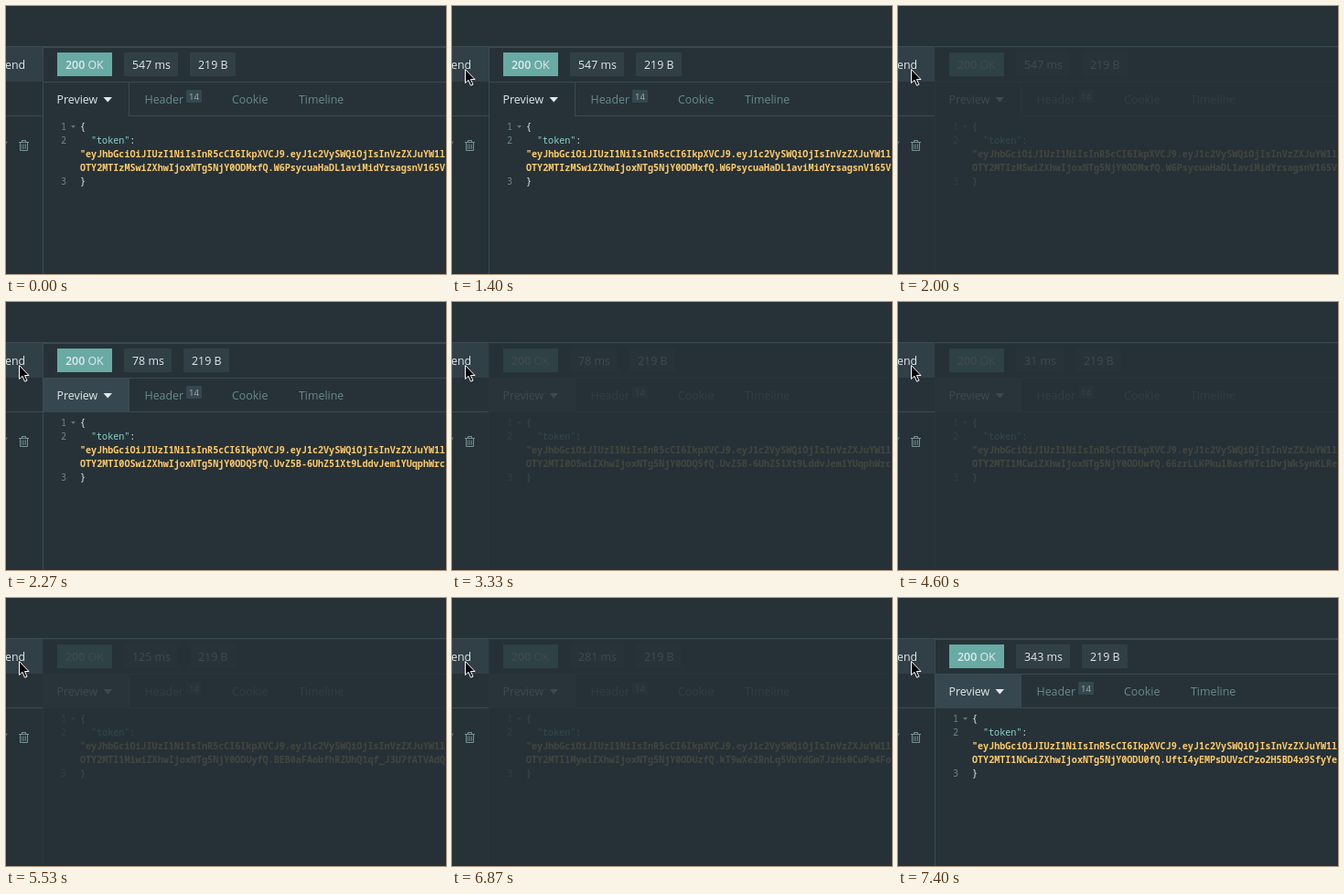
An HTML page that plays this animation: 481x294 px, repeating every 8 s.

```html
<!DOCTYPE html>
<html lang="en">
<head>
<meta charset="utf-8">
<title>Response preview</title>
<style>
  html, body { margin: 0; width: 100%; height: 100%; overflow: hidden; background: #263238; }
  svg { display: block; width: 481px; height: 294px; }
  text { font: 12.4px "Open Sans", "Noto Sans", sans-serif; fill: #e3e8ea; }
  .tab { fill: #6c898d; }
  .badge { font-size: 9.5px; fill: #9eafb4; }
  .code text { font: 500 10.08px "Noto Sans Mono", "DejaVu Sans Mono", monospace; fill: #eef3f4; }
  .code .num { fill: #71868c; font-weight: 400; }
  .code .key { fill: #8cd3cb; }
  .code .str { fill: #ffcb6b; font-weight: 600; }
  .pill { fill: #313f46; }
  .line { fill: #3b4b52; }
  .raised { fill: #37474f; }
</style>
</head>
<body>
<svg viewBox="0 0 481 294">
  <rect width="481" height="294" fill="#263238"/>

  <!-- request pane -->
  <rect y="45" width="40" height="38" fill="#313f46"/>
  <rect class="line" y="44" width="481" height="1"/>
  <rect class="line" y="120" width="40" height="1"/>
  <text x="-1" y="69">end</text>
  <path d="M-1 153L1 148.500" stroke="#6c898d" fill="none"/>
  <g fill="none" stroke="#7b9297">
    <path d="M14 149.500H25M17.500 149V147.500H21.500V149M15.500 150V158.500H23.500V150"/>
    <path d="M17.500 151.500V157M19.500 151.500V157M21.500 151.500V157" stroke-width=".8"/>
  </g>

  <!-- response pane -->
  <g class="line">
    <rect x="40" y="45" width="441" height="1"/>
    <rect x="40" y="45" width="1" height="249"/>
    <rect x="41" y="83" width="440" height="1"/>
    <rect x="134" y="120" width="347" height="1"/>
    <rect x="134" y="84" width="1" height="37"/>
  </g>
  <rect id="focus" class="raised" x="41" y="84" width="93" height="37"/>

  <rect x="56" y="51" width="60" height="26" fill="#68aaa4"/>
  <text x="65" y="69" fill="#fff"><tspan font-weight="600">200</tspan> OK</text>
  <rect id="timeBox" class="pill" x="129" y="51" height="26"/>
  <text id="time" x="138" y="69"></text>
  <g id="size">
    <rect class="pill" y="51" width="50" height="26"/>
    <text x="9" y="69">219 B</text>
  </g>

  <text x="55.500" y="107">Preview</text>
  <path d="M106.500 100H116L111.250 105.500Z" fill="#e3e8ea"/>
  <text class="tab" x="151.500" y="107">Header</text>
  <rect class="raised" x="197" y="92" width="17" height="14" rx="1"/>
  <text class="badge" x="200" y="102.500">14</text>
  <text class="tab" x="247" y="107">Cookie</text>
  <text class="tab" x="320" y="107">Timeline</text>

  <g class="code">
    <text class="num" x="60" y="136">1</text>
    <text class="num" x="60" y="151">2</text>
    <text class="num" x="60" y="196">3</text>
    <path d="M71 131H76L73.500 134Z" fill="#61757b"/>
    <text x="81" y="136">{</text>
    <text x="93" y="151"><tspan class="key">"token"</tspan>:</text>
    <text class="str" x="81" y="166">"eyJhbGciOiJIUzI1NiIsInR5cCI6IkpXVCJ9.eyJ1c2VySWQiOjIsInVzZXJuYW1l</text>
    <text class="str" id="token" x="81" y="181"></text>
    <text x="81" y="196">}</text>
  </g>

  <rect id="veil" x="40" y="45" width="441" height="249" fill="#263238"/>
  <path id="cursor" d="M.5 .5V15.500L4 12.300L6.500 18.200L9 17.200L6.500 11.500H11Z"
        fill="#000" stroke="#fff" stroke-width="1"/>
</svg>
<script>
const LOOP = 8000;
const DIM = 0.87;
const HALF = 0.45;

// duration, issued-at part, expiry part, signature
const responses = [
  ["547 ms", "IzMSw", "Mx", "W6PsycuaHaDL1aviMidYrsagsnV165V"],
  ["78 ms", "I0OSw", "Q5", "UvZ5B-6UhZ51Xt9LddvJem1YUqphWrc"],
  ["31 ms", "I1MCw", "Uw", "66zrLLKPku1BasfNTc1DvjWkSynKLRe"],
  ["125 ms", "I1Miw", "Uy", "BEB0aFAobfhRZUhQ1qf_J3U7fATVAdQ"],
  ["281 ms", "I1Myw", "Uz", "kT9wXe2RnLq5VbYdGm7JzHs0CuPa4Fo"],
  ["343 ms", "I1NCw", "U0", "UftI4yEMPsDUVzCPzo2H5BD4x9SfyYe"]
];

// start, response index, veil opacity
const paneSteps = [
  [0, 0, 0],
  [1870, 0, HALF], [2000, 0, DIM], [2200, 1, HALF], [2270, 1, 0],
  [3330, 1, DIM], [3470, 2, HALF], [3530, 2, 0],
  [4600, 2, DIM], [4800, 3, HALF], [4870, 3, 0],
  [5530, 3, DIM], [5930, 4, 0],
  [6870, 4, DIM], [7330, 5, HALF], [7400, 5, 0]
];

// start, tip x, tip y
const cursorSteps = [
  [0, -40, 78], [130, 15, 78], [200, 13, 77], [270, 9, 75], [400, 7, 74], [470, 10, 73],
  [670, 8, 72], [730, 7, 71], [1130, 18, 69], [1400, 14, 69]
];

const el = id => document.getElementById(id);
const [focus, timeBox, time, size, token, veil, cursor] =
  ["focus", "timeBox", "time", "size", "token", "veil", "cursor"].map(el);

const stepAt = (steps, t) => steps.findLast(([start]) => start <= t);

function showResponse(index) {
  const [duration, issued, expiry, signature] = responses[index];
  const width = duration.length > 5 ? 59 : 52;
  time.textContent = duration;
  timeBox.setAttribute("width", width);
  size.setAttribute("transform", `translate(${142 + width} 0)`);
  token.textContent = `OTY2MT${issued}iZXhwIjoxNTg5NjY0OD${expiry}fQ.${signature}`;
  focus.setAttribute("visibility", index ? "visible" : "hidden");
}

let shown = -1;
function draw(now) {
  const t = now % LOOP;
  const [, index, opacity] = stepAt(paneSteps, t);
  const [, x, y] = stepAt(cursorSteps, t);
  if (index !== shown) showResponse(shown = index);
  veil.setAttribute("opacity", opacity);
  cursor.setAttribute("transform", `translate(${x} ${y})`);
}

const begin = performance.now();
function tick() {
  draw(performance.now() - begin);
  requestAnimationFrame(tick);
}
tick();
</script>
</body>
</html>
```
